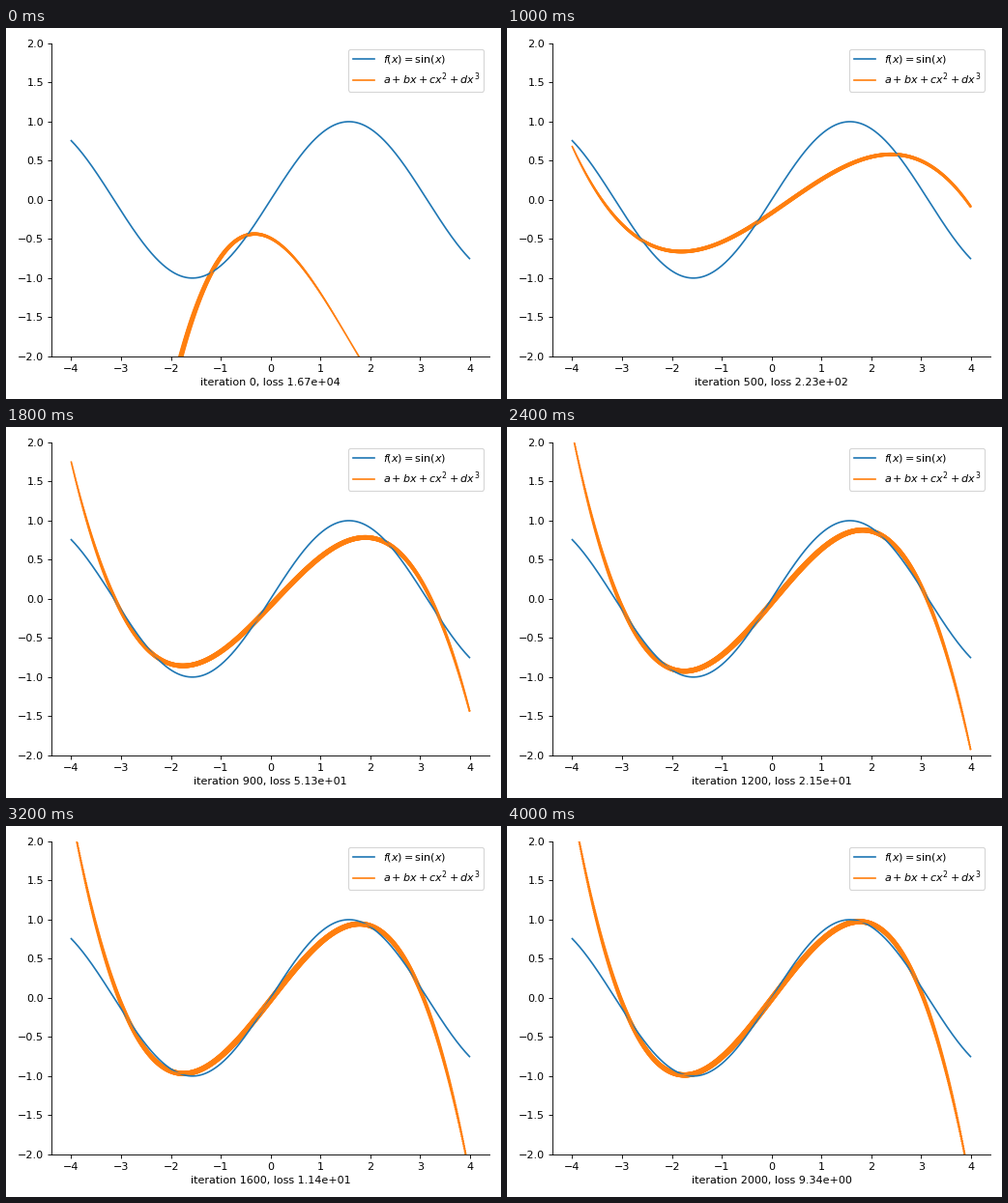
A matplotlib script that plays this animation: 512 px wide and 384 px high, repeating every 7000 ms.

```python
import numpy as np
import matplotlib.pyplot as plt
from matplotlib.animation import FuncAnimation

STEPS, EVERY, RATE = 2000, 100, 1e-6
INTERVAL, FRAMES = 200, 35
DOT_SCALE = 4.5


def train():
    """Gradient descent of a cubic on sin(x); returns (loss, weights) snapshots."""
    x = np.linspace(-np.pi, np.pi, 2000)
    basis = np.vander(x, 4, increasing=True)
    target = np.sin(x)
    w = np.array([-0.49942, -0.32799, -0.51831, 0.128953])
    shots = []
    for step in range(STEPS + 1):
        error = basis @ w - target
        w = w - RATE * 2 * basis.T @ error
        if step % EVERY == 0:
            shots.append((np.sum(error ** 2), w))
    return shots


shots = train()
xs = np.arange(-4, 4, 0.01)
powers = np.vander(xs, 4, increasing=True)

fig, ax = plt.subplots(figsize=(6.4, 4.8), dpi=80)
ax.spines[["top", "right"]].set_visible(False)
ax.plot(xs, np.sin(xs), color="C0", label=r"$f(x) = \sin(x)$")
curve, = ax.plot(xs, xs * 0, color="C1", label=r"$a + bx + cx^2 + dx^3$")
dots = ax.scatter(xs, xs * 0, s=1, color="C1", linewidths=1)
ax.set_xlim(-4.3995, 4.3895)
ax.set_ylim(-2, 2)
ax.legend(loc="best")


def update(frame):
    i = min(frame, len(shots) - 1)
    loss, w = shots[i]
    ys = powers @ w
    slope = w[1] + 2 * w[2] * xs + 3 * w[3] * xs ** 2
    curve.set_ydata(ys)
    # dots grow with the slope above its lowest value
    dots.set_offsets(np.column_stack([xs, ys]))
    dots.set_sizes(DOT_SCALE * (slope - slope.min()))
    ax.set_xlabel(f"iteration {i * EVERY}, loss {loss:.2e}")
    return curve, dots


update(0)
fig.tight_layout()
anim = FuncAnimation(fig, update, frames=FRAMES, interval=INTERVAL,
                     repeat=True, repeat_delay=0, blit=False)
plt.show()
```
